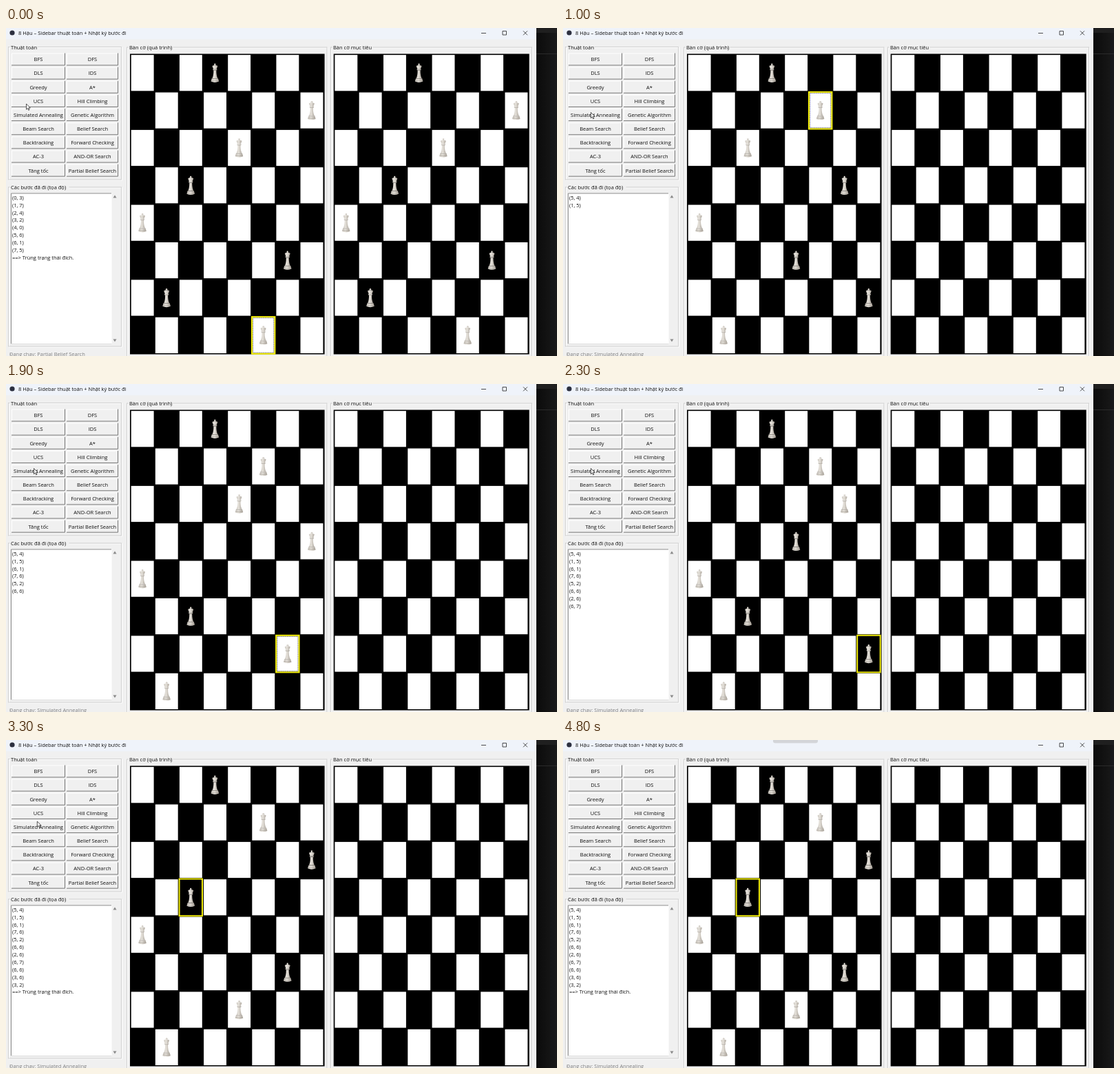
These frames come from a looping animation (800x476 px, 4900 ms). An HTML page:

```html
<!DOCTYPE html>
<html lang="vi">
<head>
<meta charset="utf-8">
<title>8 Hậu</title>
<style>
html, body { margin: 0; width: 100%; height: 100%; overflow: hidden; background: #f0f0f0; }
svg { display: block; width: 800px; height: 476px; }
text { font: 7.5px "Open Sans", "Noto Sans", sans-serif; fill: #111; white-space: pre; }
</style>
</head>
<body>
<svg viewBox="0 0 800 476">
  <defs>
    <linearGradient id="ivory">
      <stop offset="0" stop-color="#c9c4bc"/>
      <stop offset=".4" stop-color="#e6e2db"/>
      <stop offset="1" stop-color="#aea79e"/>
    </linearGradient>
    <linearGradient id="shade">
      <stop offset="0" stop-color="#0b0b0b"/>
      <stop offset="1" stop-color="#191919"/>
    </linearGradient>
    <g id="queen" fill="url(#ivory)">
      <circle cy="-12.4" r="1.3"/>
      <path d="M-4-10.2Q0-12.6 4-10.2L2.3-5.5H-2.3Z"/>
      <path d="M-3-5.6H3V-4.2H-3ZM-2-4H2Q1.8 3.5 4 7.8H-4Q-1.8 3.5-2-4Z"/>
      <path d="M-4.6 8H4.6L5.8 12.2Q0 15-5.8 12.2Z"/>
      <path d="M-4.6 8.2H4.6M-5.2 10.8Q0 12.4 5.2 10.8M-2.6-4.2H2.6" fill="none" stroke="#8f8980" stroke-width=".5"/>
    </g>
    <path id="pointer" d="M0 0V8.2L1.9 6.5 3.2 9.3 4.5 8.7 3.2 6H5.8Z" fill="#fff" stroke="#111" stroke-width=".7"/>
  </defs>
  <g id="window"></g>
  <g id="live"></g>
</svg>
<script>
const LOOP = 4900, TICK = 100;
const STEP_START = 610, STEP_TIME = 220, GLOW_TIME = 205, DONE_AT = 3000;
const ROWS = [...Array(8).keys()];

const current = { x: 198, dx: 35.12 }, goal = { x: 493.7, dx: 35.3 };
const ROW_Y = 65.3, ROW_DY = 54.38;
const oldQueens = [3, 7, 4, 2, 0, 6, 1, 5];
const startQueens = [4, 6, 2, 5, 0, 3, 7, 1];
const moves = [[5, 4], [1, 5], [6, 1], [7, 6], [5, 2], [6, 6], [2, 6], [6, 7], [6, 6], [3, 6], [3, 2]];
const pointerPath = [[0, 29.5, 110], [400, 40.5, 122.5], [3200, 40.5, 122.5], [3800, 105.5, 62], [4200, 105.5, 62], [4700, 336, -10]];
const labels = ["BFS", "DFS", "DLS", "IDS", "Greedy", "A*", "UCS", "Hill Climbing",
  "Simulated Annealing", "Genetic Algorithm", "Beam Search", "Belief Search", "Backtracking",
  "Forward Checking", "AC-3", "AND-OR Search", "Tăng tốc", "Partial Belief Search"];
const CLICKED = labels.indexOf("Simulated Annealing");

const rect = (x, y, w, h, fill, extra = "") =>
  `<rect x="${x}" y="${y}" width="${w}" height="${h}" fill="${fill}" ${extra}/>`;
const line = (d, color, width = 1) =>
  `<path d="${d}" fill="none" stroke="${color}" stroke-width="${width}"/>`;
const text = (x, y, s, extra = "") => `<text x="${x}" y="${y}" ${extra}>${s}</text>`;

function group(x, y, w, h, title, titleWidth) {
  return rect(x + 1, y + 1, w, h, "none", 'stroke="#fff"') +
    rect(x, y, w, h, "none", 'stroke="#cfcfcf"') +
    rect(x + 2, y - 4, titleWidth, 8, "#f0f0f0") + text(x + 3.5, y + 3, title);
}

function button(i, pressed) {
  const right = i % 2, x = right ? 88 : 8, w = right ? 75 : 78;
  const y = 36.5 + 20.15 * (i >> 1), h = 18;
  const upper = `M${x + .5} ${y + h}V${y + .5}H${x + w}`;
  const lower = `M${x} ${y + h - .5}H${x + w - .5}V${y}`;
  const shift = pressed ? .7 : 0;
  return rect(x, y, w, h, "#f0f0f0") +
    line(upper, pressed ? "#707070" : "#fff") + line(lower, pressed ? "#fff" : "#777") +
    text(x + w / 2 + shift, y + 11.8 + shift, labels[i], 'text-anchor="middle"');
}

function board({ x, dx }) {
  let out = rect(x - 18, 37.5, dx * 8 + 1.6, 436, "#000");
  for (const r of ROWS) for (const c of ROWS)
    if ((r + c) % 2 === 0)
      out += rect((x + c * dx - 16.3).toFixed(1), (ROW_Y + r * ROW_DY - 26.2).toFixed(1), 32.9, 52.2, "#fff");
  return out;
}

const queens = ({ x, dx }, columns) => columns.map((c, r) =>
  `<use href="#queen" x="${x + c * dx}" y="${ROW_Y + r * ROW_DY}"/>`).join("");

function glow([r, c]) {
  const x = current.x + c * current.dx - 16.6, y = ROW_Y + r * ROW_DY - 26.8;
  return rect(x, y, 33.4, 53.6, "none", 'stroke="#f5f000" stroke-width="2"') +
    rect(x + 1.5, y + 1.5, 30.4, 50.6, "none", 'stroke="#222" stroke-width=".7" stroke-dasharray="1 .6"');
}

function drawWindow() {
  const arrow = (y, dir) => `<path d="M155.5 ${y + dir * 2}H160.5L158 ${y - dir * 2}Z" fill="#8a8a8a"/>`;
  return rect(0, 0, 800, 476, "#f0f0f0") + rect(0, 0, 770, 16.5, "#eff3fa") +
    rect(770, 0, 30, 476, "url(#shade)") + rect(770, 0, 30, 7, "#1f1f1f") +
    line("M770 37.5H800", "#2b2b2b") +
    '<circle cx="9" cy="7" r="3.6" fill="#2c3040"/>' +
    text(18, 10, "8 Hậu – Sidebar thuật toán + Nhật ký bước đi") +
    line("M690 7.5H697M721 4.5H726.5V10H721ZM751 4.3L757 10.3M757 4.3L751 10.3", "#222", .8) +
    group(3.5, 27.5, 164, 192.5, "Thuật toán", 40) +
    group(3.5, 231, 164, 231, "Các bước đã đi (tọa độ)", 86) +
    group(175.5, 28, 290.5, 460, "Bàn cờ (quá trình)", 65) +
    group(471.5, 28, 292, 460, "Bàn cờ mục tiêu", 59) +
    labels.map((_, i) => button(i, false)).join("") +
    rect(7, 239.5, 146.5, 219, "#fff") + line("M7.5 458.5V240H153", "#8a8a8a") +
    line("M7 458.5H153.5", "#dedede") +
    arrow(244.5, 1) + arrow(453.5, -1) +
    board(current) + board(goal);
}

function queensAfter(count) {
  const q = [...startQueens];
  for (const [r, c] of moves.slice(0, count)) {
    const other = q.indexOf(c);
    [q[r], q[other]] = [q[other], q[r]];
  }
  return q;
}

function pointerAt(t) {
  const i = pointerPath.findIndex(p => p[0] > t);
  if (i < 0) return "";
  const [t0, x0, y0] = pointerPath[i - 1], [t1, x1, y1] = pointerPath[i];
  const u = (t - t0) / (t1 - t0), k = u * u * (3 - 2 * u);
  return `<use href="#pointer" x="${x0 + (x1 - x0) * k}" y="${y0 + (y1 - y0) * k}"/>`;
}

function drawLive(t) {
  const running = t >= STEP_START;
  const count = running ? Math.min(moves.length, Math.floor((t - STEP_START) / STEP_TIME) + 1) : 0;
  const columns = running ? queensAfter(count) : oldQueens;
  const last = running ? moves[count - 1] : [7, 5];
  const age = t - STEP_START - (count - 1) * STEP_TIME;
  const lit = !running || count === moves.length || age < GLOW_TIME;
  const log = (running ? moves.slice(0, count) : oldQueens.map((c, r) => [r, c]))
    .map(([r, c]) => `(${r}, ${c})`);
  if (!running || t >= DONE_AT) log.push("==&gt; Trùng trạng thái đích.");

  return (t >= 500 && !running ? button(CLICKED, true) : "") +
    queens(current, columns) + (running ? "" : queens(goal, oldQueens)) +
    (lit ? glow(last) : "") +
    log.map((s, i) => text(9, 248.8 + 10.87 * i, s)).join("") +
    text(5, 475.6, "Đang chạy: " + (running ? "Simulated Annealing" : "Partial Belief Search"), 'style="fill:#808080"') +
    (t >= 4700 ? rect(305, -4, 65, 8.5, "#d3d5d9", 'rx="3"') : "") +
    pointerAt(t);
}

const live = document.getElementById("live");
document.getElementById("window").innerHTML = drawWindow();
const began = performance.now();
let shown = -1;
function update() {
  const t = Math.floor((performance.now() - began) % LOOP / TICK) * TICK;
  if (t !== shown) live.innerHTML = drawLive(shown = t);
  requestAnimationFrame(update);
}
update();
</script>
</body>
</html>
```
